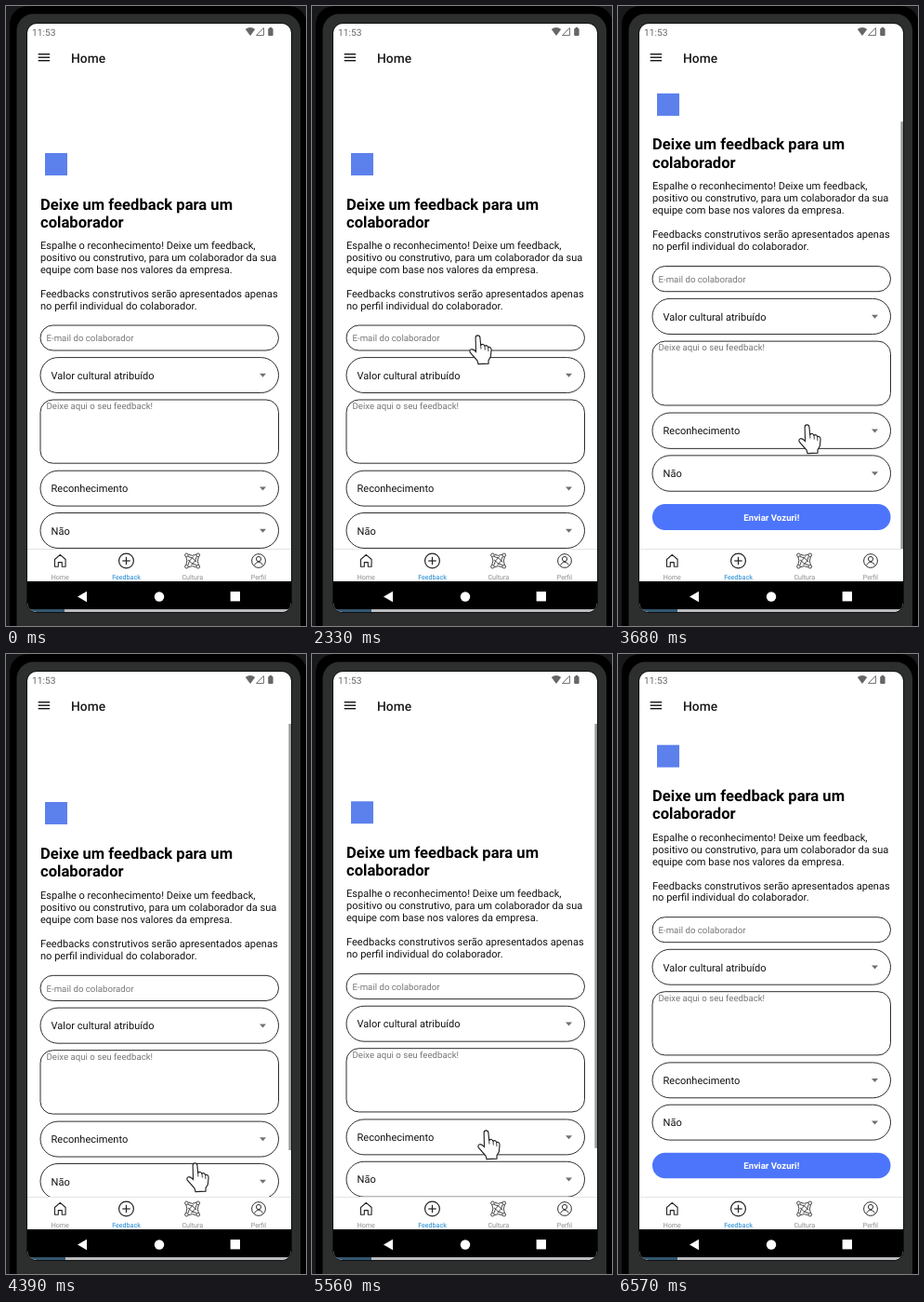
These frames come from a looping animation (323 by 666 pixels, 6.65 s). An HTML page with a canvas:

```html
<!DOCTYPE html>
<html lang="pt-BR">
<head>
<meta charset="utf-8">
<title>Feedback</title>
<style>
html, body { margin: 0; width: 100%; height: 100%; overflow: hidden; background: #000; }
canvas { display: block; width: 323px; height: 666px; }
</style>
</head>
<body>
<canvas id="stage"></canvas>
<script>
const W = 323, H = 666, LOOP = 6650;
const TOP = 74, BOTTOM = 584, VIEW = BOTTOM - TOP, MAX_SCROLL = 60.3;
const INK = '#111', GREY = '#777', BLUE = '#4c75fb';
const canvas = document.getElementById('stage');
const ctx = canvas.getContext('2d');
const dpr = window.devicePixelRatio || 1;
canvas.width = W * dpr;
canvas.height = H * dpr;
ctx.textRendering = 'geometricPrecision';

// Keys: [time, value, ...]
const handKeys = [
  [1950, 236, 430], [2330, 179, 354], [2410, 179, 354], [2580, 205, 430],
  [2910, 240, 556], [3070, 240, 556], [3520, 204, 450], [3770, 204, 450],
  [4320, 204, 547], [4710, 204, 547], [4930, 188, 512], [5560, 188, 512],
  [5940, 159, 394], [6170, 159, 394], [6400, 230, 440]
];
const scrollKeys = [[3070, 0], [3380, MAX_SCROLL], [3770, MAX_SCROLL], [4240, 0], [5560, 0], [5840, MAX_SCROLL]];
// Overscroll: positive pulls at the bottom edge, negative at the top
const pullKeys = [
  [3300, 0], [3450, 10], [3670, 3.8], [3765, 3.8], [3840, 0], [4150, 0], [4380, -3],
  [5400, -3], [5640, 0], [5740, 0], [5930, 9], [6020, 9], [6170, 0]
];
const barKeys = [[3069, 0], [3070, 1], [6240, 1], [6500, 0]];

function sample(keys, t) {
  if (t <= keys[0][0]) return keys[0].slice(1);
  for (let i = 1; i < keys.length; i++) {
    const a = keys[i - 1], b = keys[i];
    if (t < b[0]) {
      const p = (t - a[0]) / (b[0] - a[0]), e = p * p * (3 - 2 * p);
      return a.slice(1).map((v, k) => v + (b[k + 1] - v) * e);
    }
  }
  return keys[keys.length - 1].slice(1);
}

function text(str, x, y, size, color = INK, weight = 400, align = 'left') {
  ctx.font = `${weight} ${size}px Roboto, sans-serif`;
  ctx.textAlign = align;
  ctx.fillStyle = color;
  ctx.fillText(str, x, y);
}

function rect(x, y, w, h, color) {
  ctx.fillStyle = color;
  ctx.fillRect(x, y, w, h);
}

function round(x, y, w, h, r) {
  ctx.beginPath();
  ctx.roundRect(x, y, w, h, r);
}

function poly(...pts) {
  ctx.beginPath();
  for (let i = 0; i < pts.length; i += 2) ctx.lineTo(pts[i], pts[i + 1]);
  ctx.closePath();
}

function circle(x, y, r) {
  ctx.beginPath();
  ctx.arc(x, y, r, 0, Math.PI * 2);
}

function fill(color) { ctx.fillStyle = color; ctx.fill(); }

function stroke(color, width) {
  ctx.strokeStyle = color;
  ctx.lineWidth = width;
  ctx.stroke();
}

function stretch(y, pull) {
  const u = (pull > 0 ? BOTTOM - y : y - TOP) / VIEW;
  return y - pull * (1 - (1 - u) ** 2);
}

function drawBody() {
  rect(0, 0, W, H, '#17191a');
  round(4, 0, 320, 700, 20);
  fill('#000');
  round(11.5, 8.5, 305.5, 700, 18);
  fill('#2d2e2e');
  round(22.5, 18.5, 285, 633, 10.5);
  stroke('#111', 1);
  round(23, 19, 284, 632, 10);
  fill('#fff');
}

function drawHeader() {
  text('11:53', 28, 31.5, 10.2, '#666');
  ctx.beginPath();
  ctx.moveTo(263, 32);
  ctx.lineTo(257.8, 25);
  ctx.quadraticCurveTo(263, 21, 268.2, 25);
  ctx.closePath();
  fill('#666');
  poly(269.5, 31.5, 277.5, 31.5, 277.5, 23.5);
  stroke('#777', 1);
  round(282.2, 24, 5.4, 8, 1);
  fill('#666');
  rect(283.7, 22.8, 2.4, 1.5, '#666');
  for (let i = -1; i < 2; i++) rect(34.7, 54.5 + i * 3.45, 12.4, 1.4, INK);
  text('Home', 70, 60.5, 13.8, '#1c1c1e', 500);
}

function drawContent(scroll, pull, barAlpha) {
  const at = y => stretch(y - scroll, pull);
  const frame = (y1, y2, r) => {
    round(37, at(y1), 256.5, at(y2) - at(y1), r);
  };
  const field = (y1, y2, r) => {
    frame(y1, y2, r);
    stroke('#222', 0.95);
  };
  const select = (label, y) => {
    field(y - 19.2, y + 18.7, 19);
    text(label, 48.5, at(y) + 4, 11.06);
    const c = at(y);
    poly(273, c - 2, 280, c - 2, 276.5, c + 2);
    fill('#707070');
  };

  ctx.save();
  ctx.beginPath();
  ctx.rect(23, 75, 284, 508.5);
  ctx.clip();

  rect(42, at(170) - 12, 24, 24, '#5c80ec');
  text('Deixe um feedback para um', 37, at(212.5) + 6, 16.6, '#000', 700);
  text('colaborador', 37, at(231.6) + 6, 16.6, '#000', 700);
  [
    'Espalhe o reconhecimento! Deixe um feedback,',
    'positivo ou construtivo, para um colaborador da sua',
    'equipe com base nos valores da empresa.',
    '',
    'Feedbacks construtivos serão apresentados apenas',
    'no perfil individual do colaborador.'
  ].forEach((line, i) => text(line, 37, at(257 + i * 12.95) + 4, 11.06));

  field(343, 370, 13.5);
  text('E-mail do colaborador', 43.5, at(356.7) + 3.5, 9.67, GREY);
  select('Valor cultural atribuído', 396.8);
  field(423, 491.2, 13.5);
  text('Deixe aqui o seu feedback!', 43.5, at(429.7) + 3.4, 9.67, GREY);
  select('Reconhecimento', 518.4);
  select('Não', 563.7);
  frame(596, 623.5, 13.7);
  fill(BLUE);
  text('Enviar Vozuri!', 165.3, at(609.8) + 3.5, 9.67, '#fff', 700, 'center');

  if (barAlpha > 0) {
    const size = VIEW * VIEW / (VIEW + MAX_SCROLL);
    const y = TOP + scroll * VIEW / (VIEW + MAX_SCROLL);
    const y1 = stretch(y, pull), y2 = stretch(y + size, pull);
    ctx.globalAlpha = barAlpha;
    rect(304.4, y1, 2.6, y2 - y1, '#999');
  }
  ctx.restore();
}

function drawTabs() {
  rect(23, 583, 284, 35, '#fff');
  rect(23, 583, 284, 0.8, '#dedede');
  ctx.lineJoin = 'round';

  poly(52.5, 594.5, 58.3, 589.3, 64.1, 594.5, 64.1, 602.3, 60.3, 602.3, 60.3, 597.6, 56.3, 597.6, 56.3, 602.3, 52.5, 602.3);
  stroke('#222', 1.1);

  circle(129.5, 596, 7.9);
  stroke('#222', 1.2);
  rect(125.3, 595.4, 8.4, 1.2, '#222');
  rect(128.9, 591.8, 1.2, 8.4, '#222');

  // Four linked figures around the centre
  ctx.save();
  ctx.translate(200.6, 596);
  for (let i = 0; i < 4; i++) {
    circle(-6.2, -6.2, 1.8);
    stroke('#333', 0.9);
    ctx.beginPath();
    ctx.moveTo(-4.2, -6.8);
    ctx.quadraticCurveTo(0, -4.6, 4.4, -6.8);
    ctx.moveTo(-4.6, -4.6);
    ctx.quadraticCurveTo(0, -4.4, 4.6, 1.2);
    stroke('#333', 0.9);
    ctx.rotate(Math.PI / 2);
  }
  ctx.restore();

  circle(272, 596, 7.4);
  stroke('#333', 1);
  circle(272, 594, 2.6);
  stroke('#333', 1);
  ctx.beginPath();
  ctx.arc(272, 602, 4.6, Math.PI * 1.1, Math.PI * 1.9);
  stroke('#333', 1);

  ['Home', 'Feedback', 'Cultura', 'Perfil'].forEach((label, i) =>
    text(label, 58.3 + i * 71.2, 615.6, 7.1, i === 1 ? '#1583cf' : '#8b8b8d', 400, 'center'));
}

function drawNav(t) {
  rect(23, 618, 284, 30.5, '#000');
  poly(77, 634.5, 87, 628.7, 87, 640.3);
  fill('#fff');
  circle(165, 634.5, 5.2);
  fill('#fff');
  rect(241.6, 629, 10.4, 10.4, '#fff');
  rect(23, 648, 284, 3, '#b9bcbe');
  rect(23, 648, t < 1630 ? 40 : 41, 3, '#33566f');
}

function drawHand(x, y) {
  ctx.save();
  ctx.translate(x, y);
  ctx.scale(0.95, 0.97);
  ctx.beginPath();
  ctx.moveTo(-2.6, 18);
  ctx.lineTo(-3, 2.5);
  ctx.bezierCurveTo(-3, -1, 1.6, -1, 2, 2.2);
  ctx.lineTo(2.8, 10.5);
  ctx.quadraticCurveTo(6, 8.5, 7.4, 11.5);
  ctx.quadraticCurveTo(10, 9.8, 11.2, 13);
  ctx.quadraticCurveTo(14.6, 12, 14.8, 16);
  ctx.lineTo(14, 23.5);
  ctx.lineTo(11.6, 27.5);
  ctx.lineTo(11.6, 31);
  ctx.lineTo(0, 31.5);
  ctx.lineTo(-1, 28);
  ctx.lineTo(-9.4, 18.5);
  ctx.bezierCurveTo(-10.5, 14.5, -6.5, 13.8, -2.6, 18);
  ctx.closePath();
  fill('#fff');
  stroke('#222', 1.2);
  ctx.beginPath();
  for (const [kx, ky] of [[2.8, 10.5], [7.4, 11.5], [11.2, 13]]) {
    ctx.moveTo(kx, ky);
    ctx.lineTo(kx + 0.3, ky + 4.5);
  }
  stroke('#222', 0.9);
  ctx.restore();
}

function draw(now) {
  const t = now % LOOP;
  ctx.setTransform(dpr, 0, 0, dpr, 0, 0);
  drawBody();
  ctx.save();
  round(23, 19, 284, 632, 10);
  ctx.clip();
  drawHeader();
  drawContent(sample(scrollKeys, t)[0], sample(pullKeys, t)[0], sample(barKeys, t)[0]);
  drawTabs();
  drawNav(t);
  ctx.restore();
  if (t >= 1950 && t < 6400) drawHand(...sample(handKeys, t));
}

const start = performance.now();
function tick() {
  draw(performance.now() - start);
  requestAnimationFrame(tick);
}
tick();
</script>
</body>
</html>
```
